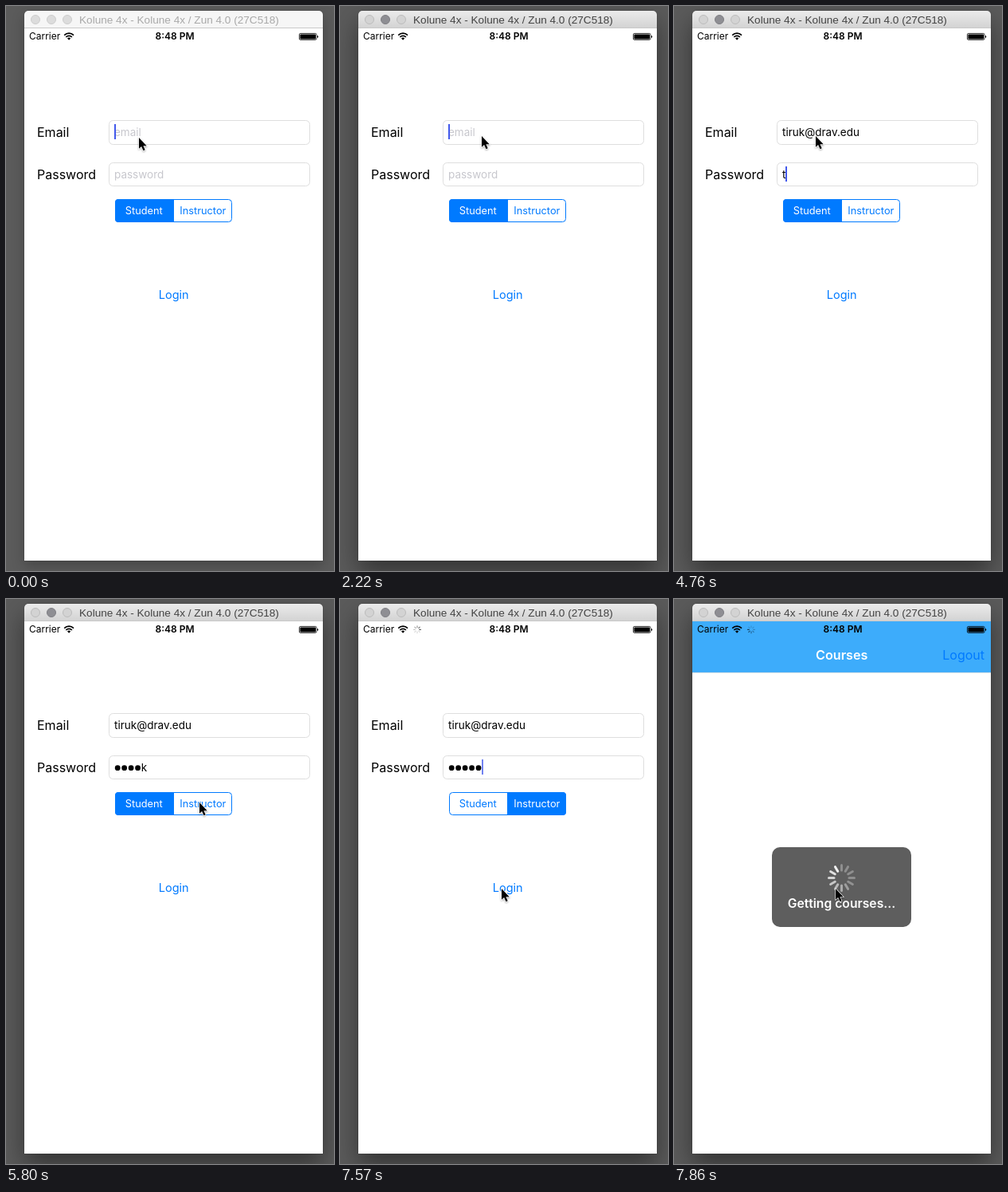
Write an HTML page that moves like this. It is 412x708 px and loops after 8000 ms.

```html
<!DOCTYPE html>
<html lang="en">
<head>
<meta charset="utf-8">
<title>Login demo</title>
<style>
  html, body { margin: 0; width: 100%; height: 100%; overflow: hidden; background: #5b5b5b; }
  #shadow {
    position: absolute; left: 23px; top: 6px; width: 375px; height: 689px; border-radius: 5px 5px 0 0;
    box-shadow: 0 6px 16px rgba(0,0,0,.25), 0 0 1px rgba(0,0,0,.5);
  }
  .active #shadow { box-shadow: 0 14px 32px rgba(0,0,0,.45), 0 0 1px rgba(0,0,0,.6); }
  svg { position: absolute; left: 0; top: 0; }
  text { font-family: Inter, Roboto, sans-serif; white-space: pre; }
  .label { font-size: 16px; }
  .input { font-size: 13.5px; }
  .hint { fill: #c7c7cd; }
  .status { font-size: 12px; }
  .seg { font-size: 12.8px; text-anchor: middle; }
  .bold { font-weight: 600; text-anchor: middle; }
  .title { font: 13.6px "Liberation Sans", Arial, sans-serif; fill: #a9a9a9; }
  .active .title { fill: #434343; }
  .bar { fill: #f6f6f6; }
  .active .bar { fill: url(#barFill); }
  .lights circle { fill: #dcdcdc; stroke: #cdcdcd; }
  .active .lights circle { fill: #d3d3d3; stroke: #bcbcbc; }
  .active .lights .mid { fill: #8e8e93; stroke: #7f7f84; }
  .field { fill: #fff; stroke: #dedede; }
  .blue { fill: #007aff; }
</style>
</head>
<body>
<div id="shadow"></div>
<svg width="412" height="708" viewBox="0 0 412 708">
  <defs>
    <linearGradient id="barFill" x2="0" y2="1">
      <stop offset="0" stop-color="#ebebeb"/><stop offset="1" stop-color="#d2d2d2"/>
    </linearGradient>
    <filter id="soft" x="-50%" y="-50%" width="200%" height="200%">
      <feDropShadow dx="0" dy="1" stdDeviation="1" flood-opacity=".4"/>
    </filter>
  </defs>

  <path class="bar" d="M23 28V11a5 5 0 0 1 5-5H393a5 5 0 0 1 5 5V28Z"/>
  <path d="M23 27.5H398" stroke="#c9c9c9"/>
  <g class="lights">
    <circle cx="37" cy="17" r="5.5"/>
    <circle class="mid" cx="57" cy="17" r="5.5"/>
    <circle cx="77" cy="17" r="5.5"/>
  </g>
  <text class="title" x="92" y="22">Kolune 4x - Kolune 4x / Zun 4.0 (27C518)</text>
  <rect x="23" y="28" width="375" height="667" fill="#fff"/>

  <g id="login">
    <text class="label" x="39" y="164">Email</text>
    <text class="label" x="39" y="216.5">Password</text>
    <rect class="field" x="129.5" y="143.5" width="252" height="30" rx="5"/>
    <rect class="field" x="129.5" y="196.5" width="252" height="29" rx="5"/>
    <text id="mailHint" class="input hint" x="136" y="163">email</text>
    <text id="passHint" class="input hint" x="136" y="215.5">password</text>
    <text id="mail" class="input" x="136" y="163"></text>
    <path id="typo" stroke="#f2453d" stroke-width="2.7" stroke-linecap="round" stroke-dasharray="0 4.2"/>
    <g id="dots"></g>
    <text id="pass" class="input" y="215.5"></text>
    <rect id="caret" width="2" height="19" fill="#4259ec"/>
    <rect x="137.5" y="242.5" width="146" height="28" rx="4" fill="#fff" stroke="#007aff"/>
    <path id="segFill" class="blue"/>
    <text id="segA" class="seg" x="173.3" y="261.3">Student</text>
    <text id="segB" class="seg" x="247.3" y="261.3">Instructor</text>
    <text id="button" class="blue" x="210.7" y="367" font-size="14.5" text-anchor="middle">Login</text>
  </g>

  <g id="courses">
    <rect x="23" y="28" width="375" height="64" fill="#3dacfb"/>
    <path d="M23 92.3H398" stroke="#b2c4d0" stroke-width=".6"/>
    <text class="bold" x="210.7" y="76" font-size="16.2" fill="#fff">Courses</text>
    <text class="label blue" x="390" y="76" text-anchor="end">Logout</text>
    <g id="hud">
      <rect x="123" y="311" width="175" height="100" rx="10" fill="#5e5e5e"/>
      <g id="bigSpin" stroke="#fff" stroke-width="3" stroke-linecap="round"></g>
      <text class="bold" x="210.5" y="387" font-size="15.7" fill="#fff">Getting courses…</text>
    </g>
  </g>

  <text class="status" x="29" y="42.4">Carrier</text>
  <g fill="none" stroke="#000" stroke-width="1.7">
    <path d="M73.2 36.6a8.4 8.4 0 0 1 11.8 0M75.3 39a5.4 5.4 0 0 1 7.6 0"/>
    <path d="M79.1 42.8l-2.1-2.2a3 3 0 0 1 4.2 0Z" fill="#000" stroke="none"/>
  </g>
  <g id="netSpin" stroke="#000" stroke-width="1.2" stroke-linecap="round"></g>
  <text class="status bold" x="212" y="42.4">8:48 PM</text>
  <rect x="368.4" y="34.4" width="21.6" height="8" rx="1.4" fill="none" stroke="#000" stroke-width=".8"/>
  <rect x="369.4" y="35.4" width="19.6" height="6" rx=".6"/>
  <path d="M391 36.7a1.8 1.8 0 0 1 0 3.4Z"/>

  <path id="mouse" d="M0 0V13.8L3.1 11L5.5 16.3L7.7 15.3L5.4 10.2H9.7Z"
        stroke="#fff" stroke-width="1.1" paint-order="stroke" filter="url(#soft)"/>
</svg>

<script>
const LOOP = 8000, TICK = 148.4, LEAD = 14;
const EMAIL = 'tiruk@drav.edu', SECRET = 'tiruk';
const $ = id => document.getElementById(id);
const set = (id, attrs) => { for (const k in attrs) $(id).setAttribute(k, attrs[k]); };
const show = (id, on) => set(id, { visibility: on ? 'visible' : 'hidden' });

// Tables hold [tick, value...]; each value stays until the next entry.
const TYPED = [[0, 0], [16, 1], [17, 2], [18, 3], [19, 4], [20, 6],
  [24, 7], [25, 9], [26, 10], [27, 11], [28, 13], [29, 14]];
const SECRET_TYPED = [[0, 0], [32, 1], [33, 3], [34, 5]];
const CARET = [[0, 1], [1, .7], [2, .3], [3, 0], [5, 1], [8, .7], [9, 0], [11, .6], [12, 1],
  [38, .5], [39, 0], [41, 1], [42, .85], [44, .3], [45, 0], [47, 1], [51, .75]];
const MOUSE = [[0, 167, 165], [11, 169, 165], [12, 174, 164], [13, 178, 163],
  [37, 202, 204], [38, 236, 246], [39, 243, 255], [41, 234, 278], [42, 215, 307],
  [43, 209, 318], [44, 205, 325], [45, 203, 342], [46, 203, 356], [47, 203, 363]];
const ACTIVE = 15, TYPO = 20, FOCUS_PASS = 30, CHOOSE = 40, MASK = 46,
  PRESS = 50, NET = 51, COURSES = 52, HUD = 53;

const at = (table, k) => table.filter(row => row[0] <= k).pop().slice(1);

function add(parent, name, attrs) {
  const el = document.createElementNS('http://www.w3.org/2000/svg', name);
  for (const k in attrs) el.setAttribute(k, attrs[k]);
  $(parent).append(el);
}

function spokes(id, cx, cy, n, r1, r2) {
  for (let i = 0; i < n; i++) {
    add(id, 'line', { x1: cx, x2: cx, y1: cy - r1, y2: cy - r2,
      transform: `rotate(${i * 360 / n} ${cx} ${cy})` });
  }
}

// The head spoke is brightest, those behind it fade.
function spin(id, head, low, high) {
  const lines = $(id).children, n = lines.length;
  for (let i = 0; i < n; i++) {
    const age = ((head - i) % n + n) % n;
    lines[i].setAttribute('opacity', Math.max(low, high - age * (high - low) / (n * .6)));
  }
}

spokes('bigSpin', 210.5, 349.5, 12, 9.5, 16);
spokes('netSpin', 97, 38.3, 8, 2.6, 4.5);
for (let i = 0; i < SECRET.length; i++) add('dots', 'circle', { cx: 140.2 + 8.45 * i, cy: 211.7, r: 3.4 });

function drawForm(k) {
  const [n] = at(TYPED, k), [p] = at(SECRET_TYPED, k);
  const hidden = k >= MASK ? p : Math.max(0, p - 1);
  const mail = $('mail'), pass = $('pass');

  mail.textContent = EMAIL.slice(0, n);
  pass.textContent = SECRET.slice(hidden, p);
  pass.setAttribute('x', 136 + 8.45 * hidden);
  [...$('dots').children].forEach((dot, i) => dot.setAttribute('opacity', i < hidden ? 1 : 0));
  set('mailHint', { opacity: n ? 0 : 1 });
  set('passHint', { opacity: p ? 0 : 1 });

  const typo = k >= TYPO && k < FOCUS_PASS;
  const end = typo ? 136 + mail.getSubStringLength(0, 5) : 136;
  set('typo', { d: `M138 165.5H${end}`, opacity: typo ? 1 : 0 });

  const inPass = k >= FOCUS_PASS;
  const width = inPass ? 8.45 * hidden + pass.getComputedTextLength() : mail.getComputedTextLength();
  set('caret', { x: Math.round(136 + width), y: inPass ? 201 : 148, opacity: at(CARET, k)[0] });

  const right = k >= CHOOSE;
  set('segFill', { d: right
    ? 'M210 242H280a4 4 0 0 1 4 4V267a4 4 0 0 1-4 4H210Z'
    : 'M211 242H141a4 4 0 0 0-4 4V267a4 4 0 0 0 4 4H211Z' });
  set('segA', { fill: right ? '#007aff' : '#fff' });
  set('segB', { fill: right ? '#fff' : '#007aff' });
  set('button', { opacity: k === PRESS ? .25 : 1 });
}

function draw(k) {
  document.body.classList.toggle('active', k >= ACTIVE);
  const [x, y] = at(MOUSE, k);
  set('mouse', { transform: `translate(${x} ${y})` });
  drawForm(k);

  const done = k >= COURSES;
  $('login').style.display = done ? 'none' : '';
  show('courses', done);
  show('netSpin', k >= NET);
  spin('netSpin', 2 + (k - NET) * 2, .15, .6);
  spin('bigSpin', 11 + (k - HUD) * 2, .3, .9);
  const scale = k < HUD ? .62 : 1;
  set('hud', { opacity: k < HUD ? .25 : 1,
    transform: `translate(210.5 361) scale(${scale}) translate(-210.5 -361)` });
}

let last = -1;
const start = performance.now();
function loop(now) {
  const t = Math.max(0, now - start) % LOOP;
  const k = Math.min(HUD, Math.floor((t + LEAD) / TICK));
  if (k !== last) draw(last = k);
  requestAnimationFrame(loop);
}
loop(start);
</script>
</body>
</html>
```
